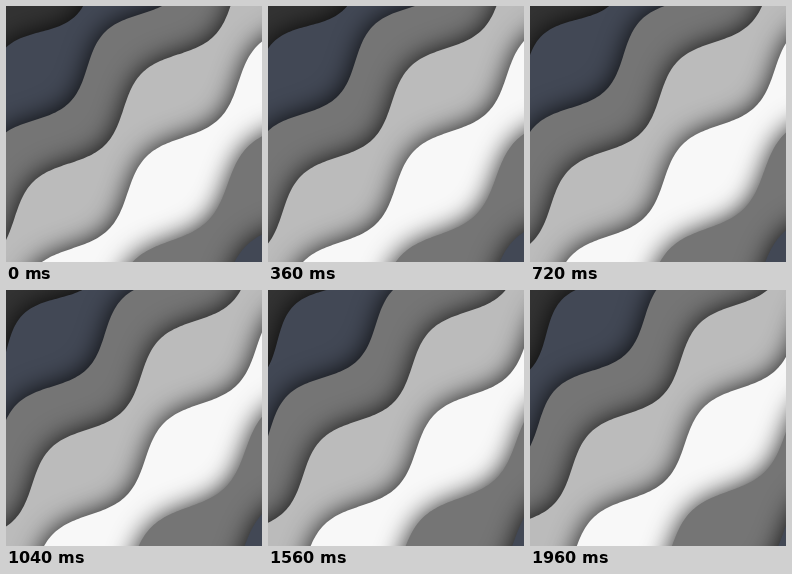
An HTML page with a canvas that plays this animation: 256x256 px, repeating every 2 s.

```html
<!DOCTYPE html>
<html>
<head>
<meta charset="utf-8">
<title>Layered waves</title>
<style>
html, body { margin: 0; width: 100%; height: 100%; overflow: hidden; background: #333; }
canvas { display: block; width: 100vw; height: 100vh; }
</style>
</head>
<body>
<canvas id="stage" width="256" height="256"></canvas>
<script>
const LOOP = 2000, STEP = 40, SPEED = 0.034;
const ctx = document.getElementById('stage').getContext('2d');

// Waves run along u = x - y and are stacked along v = x + y.
// mid: resting v, amp: height, len: wavelength, low: u of a trough at time 0
const layers = [
  { color: '#424855', mid: 60.5, amp: 19, len: 207, low: -43 },
  { color: '#757575', mid: 142.5, amp: 17.5, len: 212, low: 73 },
  { color: '#bbbbbb', mid: 220.5, amp: 17.5, len: 218, low: 69 },
  { color: '#f8f8f8', mid: 308.5, amp: 17.5, len: 222, low: -10 },
  { color: '#757575', mid: 399.5, amp: 17, len: 228, low: 101 },
  { color: '#424855', mid: 497, amp: 17, len: 232, low: 0 }
];

function lineTo(u, v) {
  ctx.lineTo((u + v) / 2, (v - u) / 2);
}

function drawLayer({ color, mid, amp, len, low }, time) {
  const trough = low + SPEED * time;
  ctx.beginPath();
  for (let u = -420; u <= 420; u += 3) {
    lineTo(u, mid - amp * Math.cos((u - trough) / len * 2 * Math.PI));
  }
  lineTo(420, 800);
  lineTo(-420, 800);
  ctx.closePath();
  ctx.fillStyle = color;
  ctx.fill();
}

function draw(time) {
  ctx.shadowColor = 'transparent';
  ctx.fillStyle = '#333333';
  ctx.fillRect(0, 0, 256, 256);
  ctx.shadowColor = 'rgba(0, 0, 0, 0.8)';
  ctx.shadowBlur = 24;
  ctx.shadowOffsetX = ctx.shadowOffsetY = -1;
  layers.forEach(layer => drawLayer(layer, time));
}

const start = performance.now();
function tick() {
  const time = (performance.now() - start) % LOOP;
  draw(Math.floor(time / STEP) * STEP);
  requestAnimationFrame(tick);
}
tick();
</script>
</body>
</html>
```
